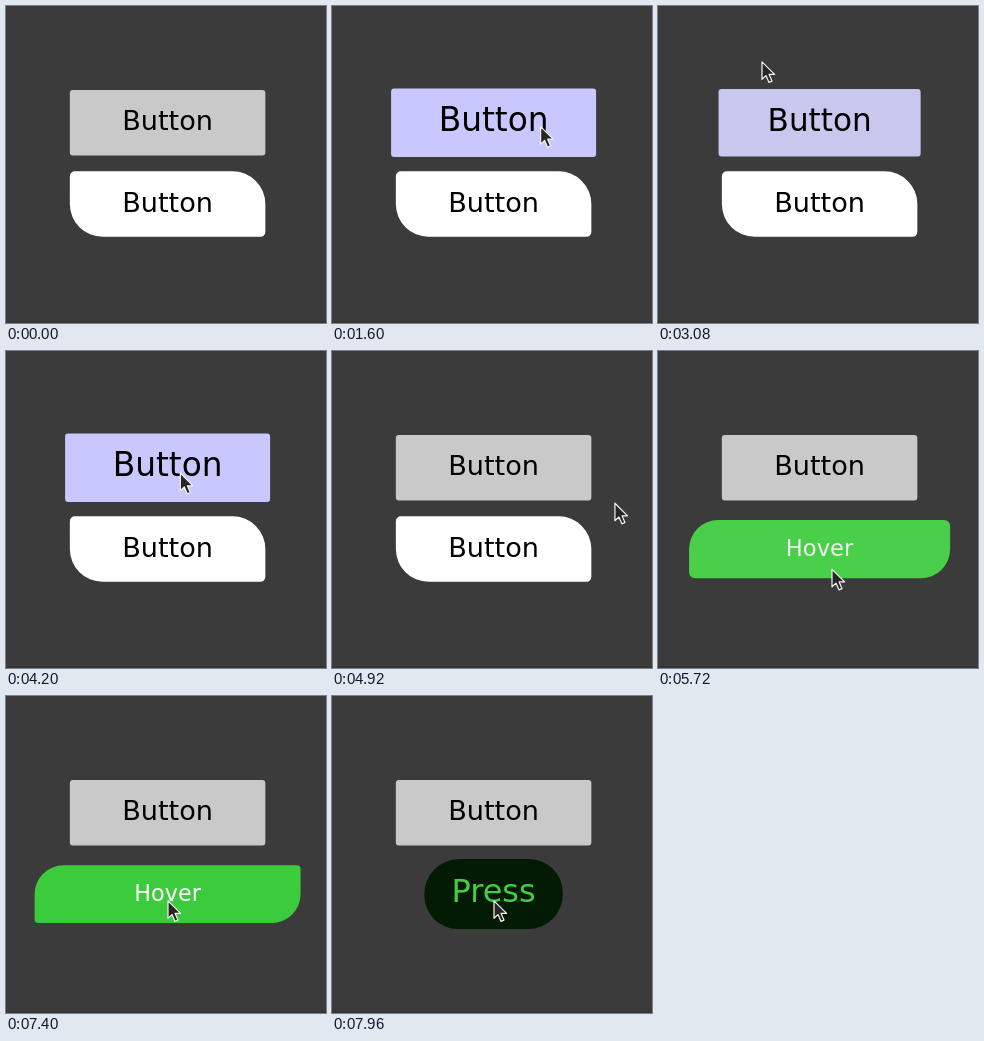
An HTML page that plays this animation: 320 by 317 pixels, repeating every 8 s.

```html
<!DOCTYPE html>
<html lang="en">
<head>
<meta charset="utf-8">
<title>Button states</title>
<style>
  html, body { margin: 0; width: 100%; height: 100%; overflow: hidden; background: #3b3b3b; }
  svg { display: block; width: 320px; height: 317px; }
  text { font-family: "DejaVu Sans", sans-serif; text-anchor: middle; }
</style>
</head>
<body>
<svg viewBox="0 0 320 317" xmlns="http://www.w3.org/2000/svg">
  <rect width="320" height="317" fill="#3b3b3b"/>
  <rect y="315" width="320" height="2" fill="#363636"/>
  <path id="boxA"/><text id="textA">Button</text>
  <path id="boxB"/><text id="textB">Button</text>
  <path id="cursor" d="M0 0V17.5L4 13.8L7 20.6L10 19.3L7.1 12.6H12.6Z"
        fill="#262626" stroke="#f4f4f4" stroke-width="1.2" stroke-linejoin="round"/>
</svg>
<script>
const LOOP = 8000, FADE = 200, CX = 161.6;
const $ = id => document.getElementById(id);
const clamp = v => Math.max(0, Math.min(1, v));
const gray = v => [v, v, v];
const BLACK = gray(0), WHITE = gray(255), LIME = [60, 203, 60];

// r: top left and bottom right corners, q: the other two
const plain = { w: 195.5, h: 65.5, size: 27.1, r: 3, q: 3, fill: gray(201), ink: BLACK };
const A = {
  idle: plain,
  hover: { ...plain, w: 205, h: 68.5, size: 32.8, fill: [200, 200, 255] }
};
const B = {
  idle: { ...plain, r: 5, q: 33, fill: WHITE },
  hover: { w: 266, h: 57.7, size: 22.3, r: 33, q: 4, fill: LIME, ink: WHITE },
  press: { w: 132.5, h: 70.6, size: 32.4, r: 35, q: 35, fill: [0, 18, 0], ink: LIME }
};

// Alternating on/off switch times
const hoverA = [1400, 3020, 3760, 4700];
const hoverB = [5535];
const pressB = [6680, 7200, 7770];

// Pointer stops: arrival time, x, y, rest
const stop = (t, x, y, rest = 0) => rest ? [[t, x, y], [t + rest, x, y]] : [[t, x, y]];
const path = [
  stop(1080, 240, 318), stop(1280, 262, 190), stop(1560, 208.6, 120.6, 360),
  stop(2780, 120, 118), stop(3080, 104, 56), stop(3240, 130, 28),
  stop(3480, 262, 36, 120), stop(4040, 174.3, 122.2, 360),
  stop(4800, 283, 140), stop(5240, 282, 215), stop(5380, 220, 285),
  stop(5660, 174, 218.3, 460), stop(6440, 162, 204.8, 1560)
].flat();

const isOn = (t, times) => times.filter(s => s <= t).length % 2 === 1;

const level = (t, times) => times.reduce(
  (v, s, i) => v + (i % 2 ? -1 : 1) * clamp((t - s) / FADE), 0);

function mix(a, b, k) {
  if (typeof a === 'number') return a + (b - a) * k;
  const out = Array.isArray(a) ? [] : {};
  for (const key in a) out[key] = mix(a[key], b[key], k);
  return out;
}

const rgb = c => `rgb(${c.map(Math.round)})`;

function set(el, attrs) {
  for (const name in attrs) el.setAttribute(name, attrs[name]);
}

function roundBox(cy, { w, h, r, q }) {
  const l = CX - w / 2, top = cy - h / 2, m = Math.min(w, h) / 2;
  r = Math.min(r, m);
  q = Math.min(q, m);
  const arc = (a, dx, dy) => `a${a} ${a} 0 0 1 ${dx * a} ${dy * a}`;
  return `M${l + r} ${top}h${w - r - q}${arc(q, 1, 1)}v${h - q - r}${arc(r, -1, 1)}` +
         `h${r + q - w}${arc(q, -1, -1)}v${q + r - h}${arc(r, 1, -1)}z`;
}

function drawButton(name, cy, s, label) {
  const text = $('text' + name);
  set($('box' + name), { d: roundBox(cy, s), fill: rgb(s.fill) });
  set(text, { x: CX, y: cy + 2 + s.size * 0.2, 'font-size': s.size, fill: rgb(s.ink) });
  if (text.textContent !== label) text.textContent = label;
}

// Smooth curve through the points that never overshoots
function along(t, axis) {
  const last = path.length - 2;
  let i = 0;
  while (i < last && path[i + 1][0] <= t) i++;
  const slope = j => j < 0 || j > last ? 0 :
    (path[j + 1][axis] - path[j][axis]) / (path[j + 1][0] - path[j][0]);
  const tangent = j => {
    const a = slope(j - 1), b = slope(j);
    return a * b > 0 ? 2 * a * b / (a + b) : 0;
  };
  const p = path[i], n = path[i + 1], d = n[0] - p[0];
  const u = clamp((t - p[0]) / d), v = 1 - u;
  return p[axis] * v * v * (1 + 2 * u) + n[axis] * u * u * (3 - 2 * u) +
         d * u * v * (tangent(i) * v - tangent(i + 1) * u);
}

function draw(t) {
  drawButton('A', 116.8, mix(A.idle, A.hover, level(t, hoverA)), 'Button');
  const s = mix(mix(B.idle, B.hover, level(t, hoverB)), B.press, level(t, pressB));
  const label = isOn(t, pressB) ? 'Press' : isOn(t, hoverB) ? 'Hover' : 'Button';
  drawButton('B', 198.1, s, label);
  set($('cursor'), {
    visibility: t < path[0][0] ? 'hidden' : 'visible',
    transform: `translate(${along(t, 1)} ${along(t, 2)})`
  });
}

const start = performance.now();
function tick() {
  draw((performance.now() - start) % LOOP);
  requestAnimationFrame(tick);
}
draw(0);
requestAnimationFrame(tick);
</script>
</body>
</html>
```
